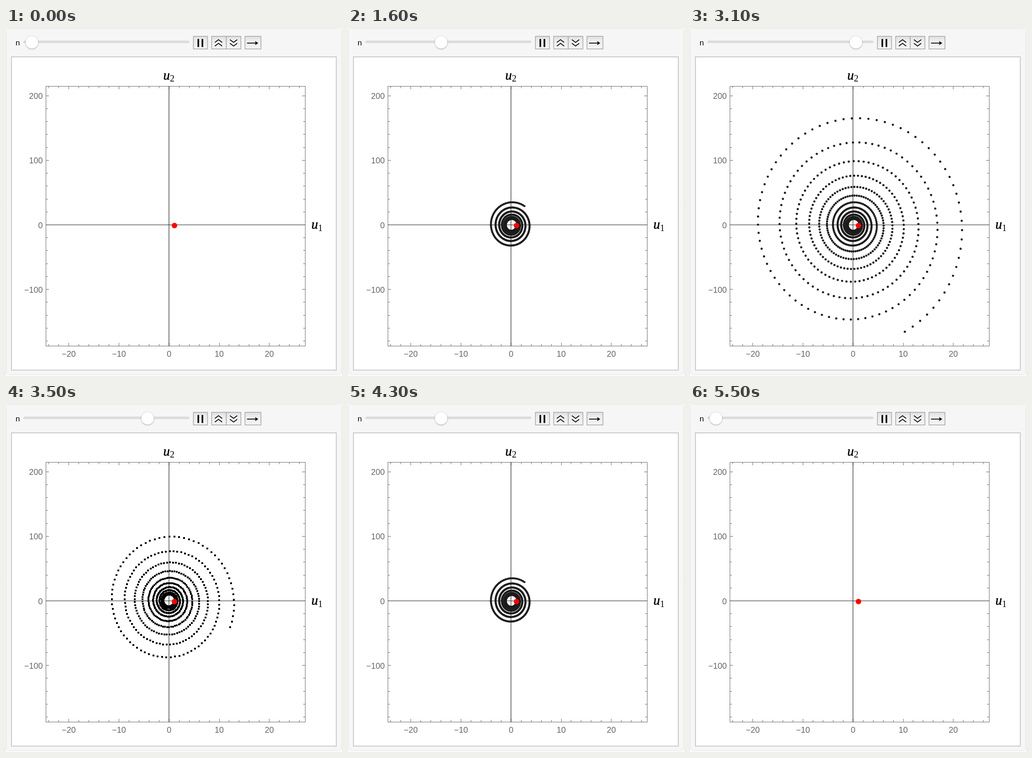
Recreate the animation shown at these times as an HTML page with a canvas. Size 736 by 761 pixels, loop 6 s.

```html
<!DOCTYPE html>
<html lang="en">
<head>
<meta charset="utf-8">
<title>Growing spiral</title>
<style>
  html, body { margin: 0; width: 100%; height: 100%; overflow: hidden; background: #fff; }
  canvas { display: block; }
</style>
</head>
<body>
<canvas id="stage" width="736" height="761"></canvas>
<script>
const ctx = document.getElementById('stage').getContext('2d');
const SANS = '"Liberation Sans", Arial, sans-serif';
const SERIF = '"Liberation Serif", Times, serif';
const LOOP = 6000, TICK = 100, LAST = LOOP / TICK - 1, MAX_N = 1000;
const plot = { left: 87, top: 127, right: 655.5, bottom: 695.5 };
const origin = { x: 357, y: 430.5 };
const scale = { x: 10.98, y: 1.4117 };

// Explicit Euler steps of u1' = u2, u2' = -k u1; the energy grows each step.
const H = 0.01, K = 200 / 3;
const orbit = [[1, 0]];
for (let i = 0; i < MAX_N; i++) {
  const [a, b] = orbit[i];
  orbit.push([a + H * b, b - H * K * a]);
}

const toX = u => origin.x + 0.2 + u * scale.x;
const toY = u => origin.y - u * scale.y;

function line(points, color, width = 1) {
  ctx.beginPath();
  points.forEach(([x, y]) => ctx.lineTo(x, y));
  ctx.strokeStyle = color;
  ctx.lineWidth = width;
  ctx.stroke();
}

function disc(x, y, r, color) {
  ctx.beginPath();
  ctx.arc(x, y, r, 0, 2 * Math.PI);
  ctx.fillStyle = color;
  ctx.fill();
}

function text(str, x, y, font, color, align = 'left') {
  ctx.font = font;
  ctx.fillStyle = color;
  ctx.textAlign = align;
  ctx.fillText(str, x, y);
}

function roundRect(x, y, w, h, r, fill, stroke) {
  ctx.beginPath();
  ctx.roundRect(x, y, w, h, r);
  ctx.fillStyle = fill;
  ctx.fill();
  if (stroke) {
    ctx.strokeStyle = stroke;
    ctx.lineWidth = 1;
    ctx.stroke();
  }
}

function button(x, w) {
  const shade = ctx.createLinearGradient(0, 18, 0, 46);
  shade.addColorStop(0, '#dedede');
  shade.addColorStop(0.3, '#ececec');
  shade.addColorStop(1, '#f4f4f4');
  ctx.fillStyle = shade;
  ctx.fillRect(x, 18, w, 28);
  ctx.strokeStyle = '#a6a6a6';
  ctx.lineWidth = 1.5;
  ctx.strokeRect(x + 0.5, 18.25, w - 1, 27.5);
}

function chevron(cx, y, dir) {
  line([[cx - 8, y + 3 * dir], [cx, y - 3 * dir], [cx + 8, y + 3 * dir]], '#000', 1.7);
}

function drawControls(fraction) {
  text('n', 21, 37.5, `17px ${SANS}`, '#000');
  roundRect(38, 27.5, 364, 5.5, 2.75, '#dcdcdc');

  ctx.save();
  ctx.shadowColor = 'rgba(0,0,0,0.35)';
  ctx.shadowBlur = 3;
  ctx.shadowOffsetY = 0.8;
  disc(56.7 + 326.6 * fraction, 31.5, 13.6, '#fff');
  ctx.restore();

  button(410, 32);
  button(450, 33);
  button(482, 33);
  button(523, 36);
  ctx.fillStyle = '#000';
  ctx.fillRect(419.5, 24, 3.5, 17.5);
  ctx.fillRect(428.5, 24, 3.5, 17.5);
  chevron(465.5, 28.5, 1);
  chevron(465.5, 36.5, 1);
  chevron(498.5, 28.5, -1);
  chevron(498.5, 36.5, -1);
  line([[528, 33], [549, 33]], '#000', 1.8);
  ctx.beginPath();
  ctx.moveTo(552.5, 33);
  ctx.lineTo(545.5, 28.5);
  ctx.lineTo(547, 33);
  ctx.lineTo(545.5, 37.5);
  ctx.fill();
}

const label = v => String(v).replace('-', '\u2212');
const snap = v => Math.floor(v) + 0.5;

function drawTicks() {
  const { left, top, right, bottom } = plot;
  const font = `18px ${SANS}`, grey = '#666';
  for (let u = -24; u <= 26; u += 2) {
    const major = u % 10 === 0, x = snap(toX(u)), len = major ? 7 : 4.5;
    line([[x, bottom], [x, bottom - len]], grey);
    line([[x, top], [x, top + len]], grey);
    if (major) text(label(u), toX(u), 719, font, grey, 'center');
  }
  for (let u = -180; u <= 200; u += 20) {
    const major = u % 100 === 0, y = snap(toY(u)), len = major ? 7 : 4.5;
    line([[left, y], [left + len, y]], grey);
    line([[right, y], [right - len, y]], grey);
    if (major) text(label(u), 80.5, toY(u) + 7, font, grey, 'right');
  }
  ctx.strokeStyle = grey;
  ctx.lineWidth = 1;
  ctx.strokeRect(left + 0.5, top + 0.5, right - left - 0.5, bottom - top - 0.5);
}

function axisName(sub, x, y) {
  text('u', x, y, `italic 29px ${SERIF}`, '#000');
  ctx.strokeStyle = '#000';
  ctx.lineWidth = 0.5;
  ctx.strokeText('u', x, y);
  text(sub, x + 14.5, y + 4.5, `20px ${SERIF}`, '#000');
}

function drawOrbit(count) {
  ctx.save();
  ctx.beginPath();
  ctx.rect(plot.left, plot.top, plot.right - plot.left + 0.5, plot.bottom - plot.top + 1);
  ctx.clip();
  const square = count % 2 === 0;
  for (let i = 1; i <= count; i++) {
    const x = toX(orbit[i][0]), y = toY(orbit[i][1]);
    if (square) {
      ctx.fillStyle = '#000';
      ctx.fillRect(Math.round(x - 2), Math.round(y - 2), 4, 4);
    } else {
      disc(x + 0.9, y + 1, 2.45, '#1c1c1c');
    }
  }
  ctx.restore();
}

// Rest for half a second, climb for 2.5 s, then mirror the way back.
function progress(time) {
  const step = Math.floor((time % LOOP) / TICK);
  const seconds = Math.min(step, LAST - step) * LOOP / 1000 / LAST;
  return Math.max(0, (seconds - 0.5) / 2.5);
}

function draw(time) {
  const fraction = progress(time);
  ctx.fillStyle = '#fff';
  ctx.fillRect(0, 0, 736, 761);
  roundRect(0.5, 0.5, 735, 758, 6, '#f6f6f6', '#e4e4e4');
  ctx.fillStyle = '#fff';
  ctx.fillRect(12, 63, 711.5, 685);
  ctx.strokeStyle = '#bfbfbf';
  ctx.lineWidth = 1.6;
  ctx.strokeRect(12, 63.2, 711.5, 685);

  drawControls(fraction);
  drawTicks();
  line([[plot.left, origin.y], [plot.right, origin.y]], '#222', 1.1);
  line([[origin.x, plot.top], [origin.x, plot.bottom]], '#222', 1.2);
  axisName('1', 669, 439);
  axisName('2', 344.5, 112.5);
  drawOrbit(Math.floor(1 + (MAX_N - 1) * fraction));
  disc(369, 432, 6, '#f00');
}

function loop() {
  draw(performance.now());
  requestAnimationFrame(loop);
}
loop();
</script>
</body>
</html>
```
